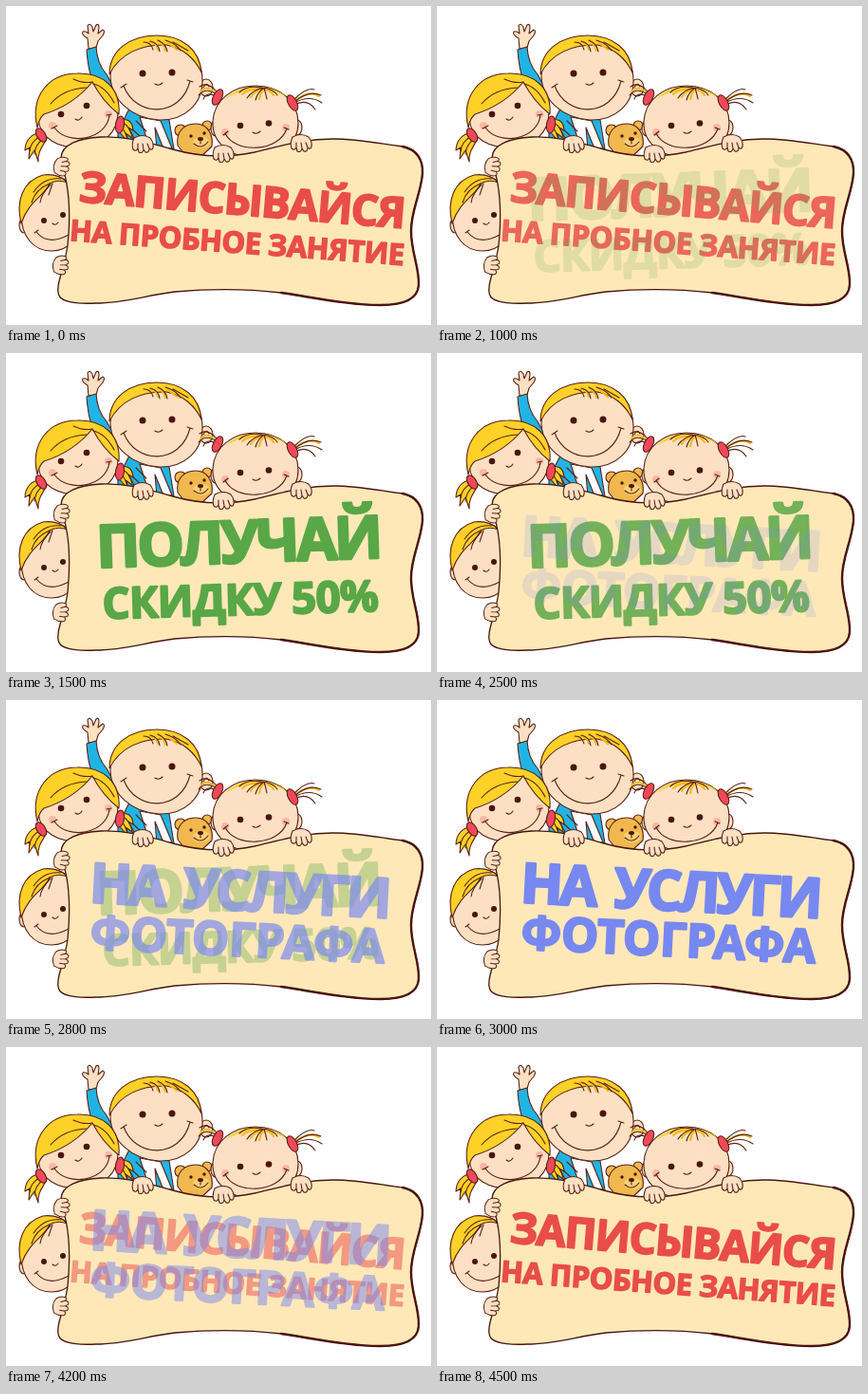
These frames come from a looping animation (448x336 px, 5.5 s). An HTML page:

```html
<!DOCTYPE html>
<html lang="ru">
<head>
<meta charset="utf-8">
<style>
  html, body { margin: 0; width: 100%; height: 100%; overflow: hidden; background: #fff; }
  svg { display: block; width: 100vw; height: 100vh; }
  text { font-family: "Open Sans", "Noto Sans", sans-serif; font-weight: 700; }
  .skin { fill: #fde0c4; }
  .hair { fill: #fdd128; }
  .blue { fill: #20b4e4; }
  .red { fill: #f0485a; }
  .bear { fill: #f0b84e; }
  .line { fill: none; }
  .strand { fill: none; stroke: #f3bd20; stroke-width: 2.2; }
  .eyes { fill: #4b160f; stroke: none; }
  .cheek { fill: #f9b8a4; stroke: none; }
</style>
</head>
<body>
<svg viewBox="0 0 448 336" stroke="#5a2115" stroke-width="1.1" stroke-linecap="round" stroke-linejoin="round">
  <defs>
    <path id="hand" class="skin" d="M-9-7Q0-12 8-7Q12-2 11 3Q10 7 7 4Q7 9 3 8L1 5Q0 10-4 8L-5 4Q-7 8-10 5Q-12 0-9-7ZM1 5L0-1M-5 4L-5-1M7 4L5-1"/>
  </defs>

  <g id="waving-boy">
    <path class="skin" d="M87 45L86 34Q79 30 81 27Q84 26 87 29L86 21Q88 17 91 22L92 27L95 20Q98 18 98 23L97 29L102 25Q105 26 102 31L97 37L95 44Z"/>
    <path class="blue" d="M85 46L95 43Q96 61 106 72L116 90L92 82Q86 65 85 46Z"/>
    <path class="blue" d="M118 132L130 108L172 120L177 151H118Z"/>
    <path fill="#fff" d="M141 117L163 121L175 150H166L157 128L159 151H152Z"/>
    <path class="line" d="M131 128L142 138M137 121L148 132"/>
    <ellipse class="skin" cx="211" cy="86" rx="7" ry="9"/>
    <path class="line" d="M208 86Q211 79 214 85"/>
    <path class="skin" d="M110 74C111 48 132 32 159 32C187 32 206 51 207 77C208 103 188 121 161 120C132 118 111 99 110 74Z"/>
    <path class="hair" d="M109 72C109 47 130 31 159 31C186 31 204 46 206 70C199 55 186 44 169 41C143 40 120 50 109 72Z"/>
    <path class="strand" d="M151 38Q158 38 160 46M160 37Q166 39 168 47M170 38L180 46"/>
    <path class="line" d="M145 38Q153 38 155 46M152 37Q161 39 162 48M160 36Q169 40 170 48M168 36Q180 40 184 47M176 38L192 47"/>
    <g class="eyes"><circle cx="144" cy="71" r="3.500"/><circle cx="175" cy="70" r="3.500"/></g>
    <path class="line" d="M124 84C136 117 184 119 194 79M121 86L127 82M191 78L197 80M157 82Q161 85 165 81"/>
  </g>

  <g id="bear">
    <circle class="bear" cx="184" cy="131" r="6"/>
    <circle class="bear" cx="212" cy="126" r="5"/>
    <path class="bear" d="M181 147C179 133 187 124 200 124C212 124 219 135 217 148L206 158H190Z"/>
    <ellipse cx="206" cy="144" rx="9" ry="6" fill="#f8cf75" stroke="none"/>
    <g class="eyes"><circle cx="195" cy="137" r="1.700"/><circle cx="209" cy="134" r="1.700"/><ellipse cx="205" cy="140" rx="3" ry="2"/></g>
    <path class="line" d="M205 141V145M198 145Q206 152 213 143"/>
  </g>

  <g id="girl-with-tails">
    <path class="hair" d="M36 134C27 134 20 142 20 152L25 149L24 161L30 152L34 164C33 152 40 147 43 139Z"/>
    <path class="hair" d="M120 120Q133 117 134 131L129 128L136 141L126 134L129 144L119 132Z"/>
    <path class="line" d="M35 138Q26 143 25 153M38 141Q31 146 30 156M123 123Q130 126 133 138M122 127L128 138"/>
    <path class="skin" d="M34 119C32 94 51 78 77 77C101 77 118 93 118 112C118 134 102 147 80 149C55 150 36 140 34 119Z"/>
    <path class="hair" d="M33 128C25 94 46 71 75 71C103 70 121 87 119 114C110 107 99 95 91 80C78 96 59 108 40 114Q35 118 33 128Z"/>
    <path class="line" d="M91 80Q82 82 71 77M85 86Q61 87 47 103M92 82Q105 85 114 102"/>
    <ellipse class="red" cx="37" cy="136" rx="4.500" ry="8" transform="rotate(-32 37 136)"/>
    <ellipse class="red" cx="120" cy="125" rx="4.500" ry="9" transform="rotate(8 120 125)"/>
    <g class="cheek"><circle cx="49" cy="126" r="4"/><circle cx="108" cy="114" r="4"/></g>
    <g class="eyes"><circle cx="58" cy="114" r="3.300"/><circle cx="85" cy="105" r="3.300"/></g>
    <path class="line" d="M51 128C65 148 106 141 109 115M48 129L54 126M106 115L111 114M73 119Q77 122 80 117"/>
  </g>

  <g id="girl-with-bands">
    <path class="strand" d="M222 92Q210 82 205 91M303 101Q319 88 330 95"/>
    <path class="line" d="M222 90Q212 79 204 85M222 93Q210 85 203 94M222 95Q211 90 208 98M303 99Q317 85 325 88M304 101Q319 88 332 94M304 102Q320 93 333 102M304 104Q318 97 326 109"/>
    <ellipse class="skin" cx="221" cy="129" rx="5" ry="8"/>
    <ellipse class="skin" cx="307" cy="128" rx="5" ry="8"/>
    <path class="skin" d="M218 122C219 99 239 84 263 84C289 84 308 101 308 123C308 146 289 159 264 160C238 160 217 145 218 122Z"/>
    <path class="hair" stroke="none" d="M231 98Q244 85 264 85Q285 86 296 96Q282 88 264 89Q246 88 231 98Z"/>
    <path class="strand" d="M272 87Q255 87 249 93M272 87Q261 90 258 96M272 87Q268 92 267 98M272 87Q280 90 282 94"/>
    <path class="line" d="M270 86Q254 83 246 91M272 86Q260 88 254 97M272 86Q265 91 263 99M272 86Q274 93 275 98M272 86Q282 88 286 94"/>
    <ellipse class="red" cx="223" cy="96" rx="4.500" ry="9" transform="rotate(27 223 96)"/>
    <ellipse class="red" cx="302" cy="102" rx="4.500" ry="9" transform="rotate(-28 302 102)"/>
    <g class="cheek"><circle cx="231" cy="133" r="4"/><circle cx="295" cy="128" r="4"/></g>
    <g class="eyes"><circle cx="247" cy="126" r="3.300"/><circle cx="277" cy="123.500" r="3.300"/></g>
    <path class="line" d="M231 134C241 156 288 154 296 129M229 136L234 132M293 128L298 130M260 133Q264 136 268 132"/>
  </g>

  <g id="peeking-boy">
    <ellipse class="skin" cx="19" cy="231" rx="5" ry="8"/>
    <path class="skin" d="M16 219C16 195 31 179 49 179C66 179 79 196 79 221C79 244 66 258 48 258C29 258 16 243 16 219Z"/>
    <path class="hair" d="M16 229C10 205 18 184 39 178Q55 176 65 186Q54 182 46 187C41 200 24 205 16 229Z"/>
    <path class="line" d="M58 182Q40 180 29 196M46 187Q31 193 27 207M47 188Q37 198 36 207M49 187L45 199"/>
    <g class="eyes"><circle cx="40" cy="226" r="3"/><circle cx="60" cy="220" r="3"/></g>
    <path class="line" d="M32 238Q44 253 66 241M30 239L34 236M49 229Q52 232 55 228"/>
  </g>

  <path fill="#fee8b8" stroke="#4b150f" stroke-width="1.300" d="M58 160C58 146 77 139 100 138C130 137 150 144 176 151C200 158 228 161 262 154C296 146 316 140 345 140C373 140 399 146 418 148C433 151 440 162 439 177C437 199 427 215 427 237C427 260 436 275 435 294C434 309 418 315 395 315C362 315 330 308 290 302C255 298 212 298 178 301C146 305 124 313 95 313C74 314 58 312 55.500 304C52 294 61 279 65 252C68 222 67 198 62 178Q58 168 58 160Z"/>
  <path class="line" stroke="#4b150f" stroke-width="2.400" d="M418 148C433 151 440 162 439 177C437 199 427 215 427 237C427 260 436 275 435 294C434 309 418 315 395 315C362 315 330 308 290 302"/>

  <use href="#hand" x="144" y="146"/>
  <use href="#hand" x="229" y="156"/>
  <use href="#hand" x="311" y="145"/>
  <use href="#hand" transform="translate(59 169) rotate(-78) scale(.9)"/>
  <use href="#hand" transform="translate(58 273) rotate(-82) scale(.9)"/>

  <g class="message" fill="#e94d4b" stroke="#e94d4b">
    <text font-size="45" letter-spacing="-1.200" stroke-width="2" transform="translate(76 206) rotate(4.700)">ЗАПИСЫВАЙСЯ</text>
    <text font-size="31" letter-spacing="-.4" stroke-width="1.500" transform="translate(66.500 247) rotate(4.200)">НА ПРОБНОЕ ЗАНЯТИЕ</text>
  </g>
  <g class="message" fill="#59a747" stroke="#59a747">
    <text font-size="62" letter-spacing="-3" stroke-width="3" transform="translate(96 226) rotate(-2)">ПОЛУЧАЙ</text>
    <text font-size="45.500" letter-spacing="-.6" stroke-width="2.200" transform="translate(102 280) rotate(-1.600)">СКИДКУ 50%</text>
  </g>
  <g class="message" fill="#7788f0" stroke="#7788f0">
    <text font-size="58" letter-spacing="-3.200" word-spacing="9" stroke-width="3" transform="translate(87.500 213) rotate(3)">НА УСЛУГИ</text>
    <text font-size="49.200" stroke-width="2.400" transform="translate(88 262) rotate(2.800)">ФОТОГРАФА</text>
  </g>
</svg>
<script>
  const messages = document.querySelectorAll(".message");
  const SLOT = 1500, HOLD = 1000, LOOP = 5500;

  function draw(now) {
    const time = now % LOOP;
    const slot = Math.floor(time / SLOT);
    const elapsed = time % SLOT;
    // Each message holds, then dissolves into the next one in six steps.
    const mix = elapsed < HOLD ? 0 : (Math.floor((elapsed - HOLD) / 100) + 1) / 6;
    messages.forEach((message, i) => {
      message.style.opacity = i === slot % 3 ? 1 - mix : i === (slot + 1) % 3 ? mix : 0;
    });
    requestAnimationFrame(() => draw(performance.now() - start));
  }

  const start = performance.now();
  draw(0);
</script>
</body>
</html>
```
